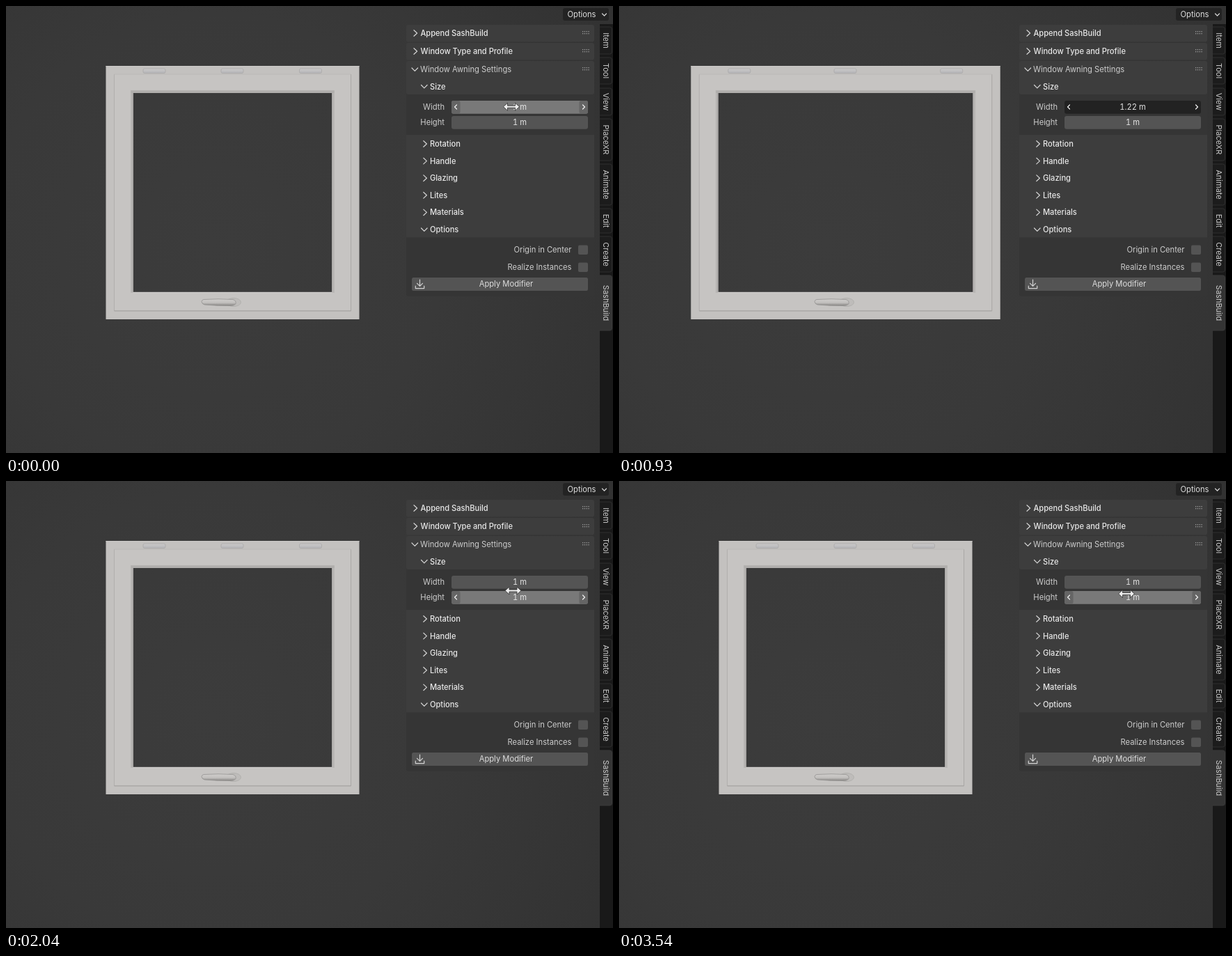
An HTML page that plays this animation: 872 by 642 pixels, repeating every 3.66 s.

```html
<!DOCTYPE html>
<html lang="en">
<head>
<meta charset="utf-8">
<title>Window size settings</title>
<style>
html, body { margin: 0; width: 100%; height: 100%; overflow: hidden; background: #383838; }
svg { display: block; width: 872px; height: 642px; }
text { font: 400 11.2px Inter, "Open Sans", sans-serif; fill: #dedede; white-space: pre; }
.title { font-weight: 500; font-size: 11.1px; fill: #e8e8e8; }
.dim { fill: #cdcdcd; }
.tab { font-size: 11px; fill: #c9c9c9; }
.value { font-feature-settings: "tnum"; fill: #e6e6e6; }
.line { fill: none; stroke: #d4d4d4; stroke-width: 1.2; stroke-linecap: round; stroke-linejoin: round; }
</style>
</head>
<body>
<svg viewBox="0 0 872 642">
  <defs>
    <radialGradient id="room" gradientUnits="userSpaceOnUse" cx="300" cy="340" r="660">
      <stop offset="0" stop-color="#3c3c3c"/>
      <stop offset=".5" stop-color="#393939"/>
      <stop offset="1" stop-color="#323232"/>
    </radialGradient>
    <linearGradient id="grip" x2="0" y2="1">
      <stop offset="0" stop-color="#cfcdcb"/>
      <stop offset=".55" stop-color="#c2c0be"/>
      <stop offset="1" stop-color="#858381"/>
    </linearGradient>
    <linearGradient id="hinge" x2="0" y2="1">
      <stop offset="0" stop-color="#cbcaca"/>
      <stop offset="1" stop-color="#b4b4b7"/>
    </linearGradient>
  </defs>
  <rect width="872" height="642" fill="url(#room)"/>
  <g id="model"></g>
  <g id="panel"></g>
  <g id="fields"></g>
  <g id="cursor">
    <path d="M-11.5 0L-5.5 -5.5V-1.5H5.5V-5.5L11.5 0L5.5 5.5V1.5H-5.5V5.5Z"
      fill="#ececec" stroke="#3a3a3a" stroke-width=".9" stroke-linejoin="round"/>
  </g>
</svg>
<script>
const LOOP = 3660, STEP = 30;
const $ = id => document.getElementById(id);

const rect = (x, y, w, h, fill, r = 0, extra = '') =>
  `<rect x="${x}" y="${y}" width="${w}" height="${h}" rx="${r}" fill="${fill}" ${extra}/>`;
const label = (x, y, s, cls = '', anchor = 'start') =>
  `<text x="${x}" y="${y + 4}" class="${cls}" text-anchor="${anchor}">${s}</text>`;
const line = (d, extra = '') => `<path class="line" d="${d}" ${extra}/>`;
const closed = (x, y) => line(`M${x} ${y - 4.3}l4.6 4.3l-4.6 4.3`);
const opened = (x, y) => line(`M${x} ${y - 2}l4.3 4.4l4.3 -4.4`);

// Linear interpolation through [time, value] pairs
function track(keys, t) {
  const i = keys.findIndex(k => k[0] > t);
  if (i < 0) return keys[keys.length - 1][1];
  if (i === 0) return keys[0][1];
  const [t0, a] = keys[i - 1], [t1, b] = keys[i];
  return a + (b - a) * (t - t0) / (t1 - t0);
}

const widthKeys = [[360, 1], [690, 1.117], [900, 1.207], [1140, 1.318], [1200, 1.333],
                   [1440, 1.183], [1500, 1.153], [1680, 1]];
const heightKeys = [[2520, 1], [2700, 1.067], [2850, 1.15], [3000, 1.25], [3090, 1.25], [3390, 1]];
const cursorX = [[1920, 726], [2040, 728.5], [2160, 729]];
const cursorY = [[1920, 144.7], [2040, 157.5], [2160, 162]];

function dots(y) {
  let s = '';
  for (let i = 0; i < 8; i++) s += rect(828 + (i % 4) * 2.8, y + (i >> 2) * 3 - 3, 1.3, 1.3, '#9a9a9a');
  return s;
}

function drawPanel() {
  const light = '#3d3d3d', dark = '#353535', button = '#545454';
  let s = rect(575, 27, 270, 24.5, light, 3) + rect(575, 53, 270, 24.5, light, 3)
    + rect(575, 79, 270, 338, dark, 3) + rect(575, 79, 270, 48, light, 3)
    + rect(575, 185, 270, 147.5, light);

  s += closed(586, 39) + label(595.5, 39, 'Append SashBuild', 'title');
  s += closed(586, 65) + label(595.5, 65, 'Window Type and Profile', 'title');
  s += opened(583, 91) + label(595, 91, 'Window Awning Settings', 'dim');
  s += [39, 65, 91].map(dots).join('');

  s += opened(596.5, 115.5) + label(609, 115.5, 'Size', 'title');
  ['Rotation', 'Handle', 'Glazing', 'Lites', 'Materials'].forEach((name, i) => {
    const y = 198 + i * 24.6;
    s += closed(599.8, y) + label(609, y, name, 'title');
  });
  s += opened(596.5, 321) + label(609, 321, 'Options', 'title');

  s += label(630, 145, 'Width', 'dim', 'end') + label(630, 167, 'Height', 'dim', 'end');
  [['Origin in Center', 350], ['Realize Instances', 375]].forEach(([name, y]) => {
    s += label(812.5, y, name, 'dim', 'end') + rect(822, y - 6.5, 14, 13.5, button, 2);
  });
  s += rect(583, 390, 253, 19, button, 2.5) + label(718.5, 399, 'Apply Modifier', '', 'middle');
  s += line('M594.5 393v9M590.5 398.3l4 4l4 -4M588.3 402v3.6h12.4v-3.6');

  s += rect(800, 3, 66, 18, '#232323', 3) + label(806.5, 12, 'Options')
    + line('M856.5 11l3 3l3 -3');

  s += rect(853, 26, 19, 616, '#191919');
  const tabs = [['Item', 30, 69], ['Tool', 74, 112], ['View', 118, 157], ['PlaceXR', 162, 222],
                ['Animate', 227, 286], ['Edit', 291, 326], ['Create', 331, 382], ['SashBuild', 387, 466]];
  tabs.forEach(([name, top, end], i) => {
    const active = i === tabs.length - 1;
    const r = 'a3 3 0 0 1 ';
    s += `<path d="M853 ${top}h14.5${r}3 3V${end - 3}${r}-3 3H853" fill="${active ? '#343434' : '#1c1c1c'}"
      stroke="${active ? '#3a3a3a' : '#2f2f2f'}"/>`;
    s += `<g transform="translate(861.5 ${(top + end) / 2}) rotate(90)">`
      + label(0, 0, name, 'tab', 'middle') + '</g>';
  });
  $('panel').innerHTML = s;
}

function drawModel(w, h) {
  const left = 325.5 - 182 * w, right = 325.5 + 182 * w, top = 450 - 364 * h, bottom = 450;
  const gl = left + 39, gr = right - 39, gt = top + 39, gb = 411;
  const sl = left + 12, sr = right - 12, st = top + 12, sb = 438;
  const hole = `M${gl} ${gt}V${gb}H${gr}V${gt}Z`;
  const ring = (l, t, r, b, fill) =>
    `<path d="M${l} ${t}H${r}V${b}H${l}Z${hole}" fill="${fill}" fill-rule="evenodd"/>`;

  let s = ring(left, top, right, bottom, '#c3c1bf') + ring(sl, st, sr, sb, '#c6c4c2');
  s += rect(left, top, right - left, 1, '#cccac8');
  s += rect(sl - .5, st, 1, sb - st, '#b1afad') + rect(sr - .5, st, 1, sb - st, '#a9a7a5')
    + rect(sl, st - .5, sr - sl, 1, '#bcbab8') + rect(sl, sb - .7, sr - sl, 1.2, '#a3a19f');

  // Rebate around the opening
  s += ring(gl - 3.5, gt - 4, gr + 3.5, gb + 1, '#b9b7b5');
  s += rect(gl - 3, gt - 3.5, gr - gl + 6, 3.5, '#b0aeac')
    + rect(gl - 1.2, gt, 1.2, gb - gt, '#a5a3a1')
    + rect(gr, gt, 1, gb - gt, '#acaaa8')
    + rect(gl, gb - .2, gr - gl, 1.2, '#d0cecc');

  const lift = h > 1.01 ? 1.2 : 0;
  [left + 53.5, 309, right - 86].forEach(x => {
    s += rect(x, top + 4 - lift, 32, 6.5, 'url(#hinge)', 2, 'stroke="#aaa9a9" stroke-width=".8"');
  });

  s += `<ellipse cx="327" cy="425.5" rx="10.5" ry="6" fill="#bebcba" stroke="#aeacaa" stroke-width=".8"/>`;
  s += `<path d="M284 421.5Q305 420 326 421.5Q331 423 330 427.5Q328 431 320 430.5Q303 430.5 285 429
    Q281 427.5 281 424.5Q281.5 422 284 421.5Z" fill="url(#grip)" stroke="#8f8d8b" stroke-width=".7"/>`;
  $('model').innerHTML = s;
}

function field(y, value, state) {
  const fill = { idle: '#545454', hover: '#797979', drag: '#222222' }[state];
  let s = rect(640, y - 9, 196, 18.7, fill, 3);
  if (state === 'hover') {
    s += rect(640, y - 9, 12.5, 18.7, '#656565', 3) + rect(823.5, y - 9, 12.5, 18.7, '#656565', 3);
  }
  if (state !== 'idle') {
    s += line(`M647.5 ${y - 3}l-3 3l3 3M828.5 ${y - 3}l3 3l-3 3`, 'style="stroke:#f0f0f0"');
  }
  return s + label(738, y, `${+value.toFixed(2)} m`, 'value', 'middle');
}

function draw(t) {
  const w = track(widthKeys, t), h = track(heightKeys, t);
  const x = t >= 3540 ? 729 : track(cursorX, t);
  const y = t >= 3540 ? 162 : track(cursorY, t);
  const dragWidth = t >= 120 && t < 1740, dragHeight = t >= 2280 && t < 3540;
  const onWidth = y < 156;

  drawModel(w, h);
  $('fields').innerHTML =
    field(145, w, dragWidth ? 'drag' : onWidth ? 'hover' : 'idle') +
    field(167, h, dragHeight ? 'drag' : onWidth ? 'idle' : 'hover');
  $('cursor').setAttribute('transform', `translate(${x} ${y})`);
  $('cursor').setAttribute('visibility', dragWidth || dragHeight ? 'hidden' : 'visible');
}

let shown = -1;
const start = performance.now();
function tick() {
  const step = Math.floor((performance.now() - start) % LOOP / STEP);
  if (step !== shown) draw((shown = step) * STEP);
  requestAnimationFrame(tick);
}
drawPanel();
tick();
</script>
</body>
</html>
```
